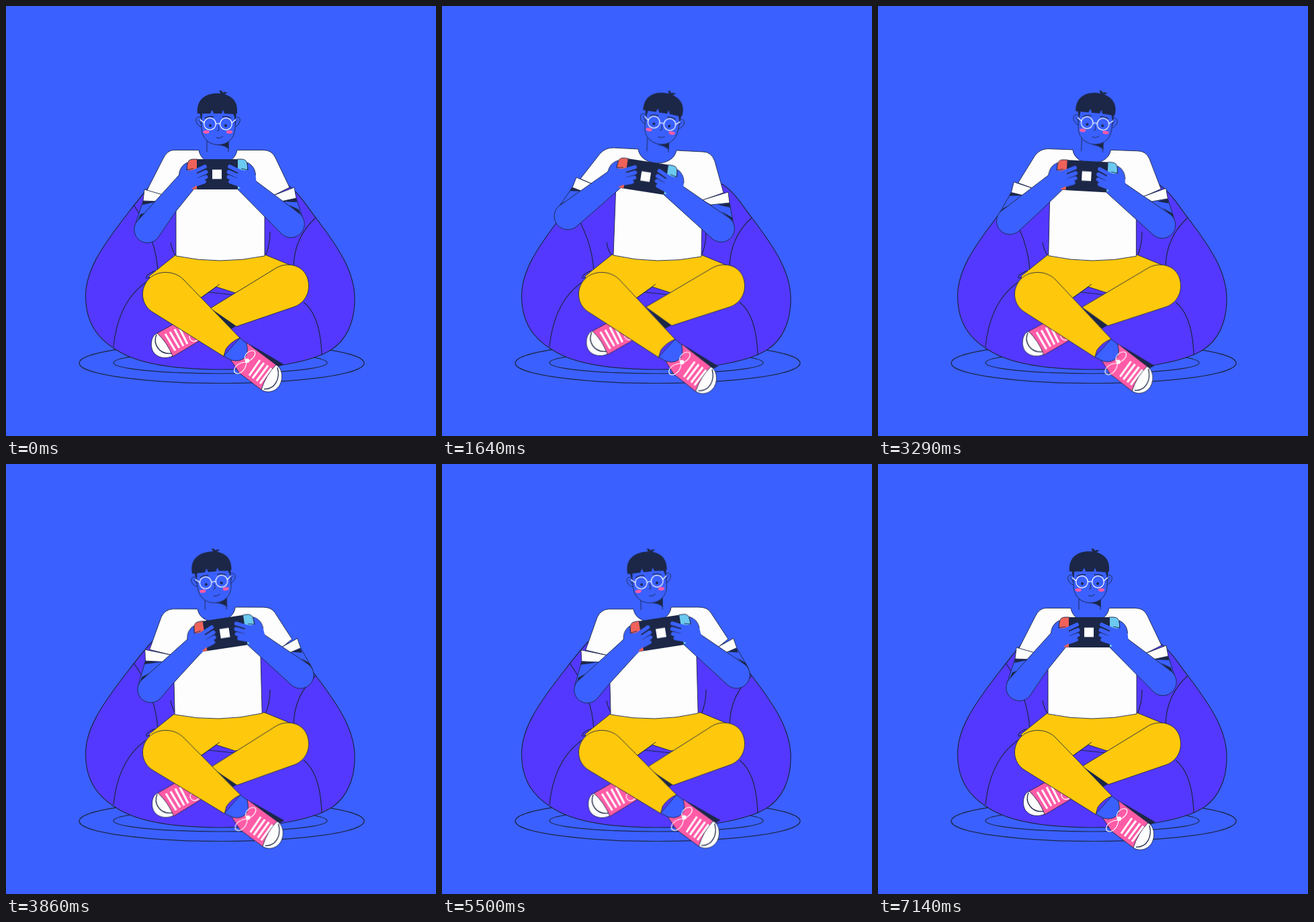
Write an HTML page without scripts that moves like this. It is 640x640 px and loops after 7.21 s.

```html
<!DOCTYPE html>
<html lang="en">
<head>
<meta charset="utf-8">
<title>Handheld gaming on a beanbag</title>
<style>
  :root { --bg: #3a60ff; --ink: #1c2747; --bag: #5438ff; --sun: #fec80c; --pink: #ff5ba7; }
  html, body { margin: 0; width: 100%; height: 100%; overflow: hidden; background: var(--bg); }
  svg { display: block; width: 100vw; height: 100vh; }
  svg { fill: none; stroke: var(--ink); stroke-width: .9; stroke-linejoin: round; }

  .skin { fill: var(--bg); }
  .white { fill: #fdfdfd; }
  .bag { fill: var(--bag); }
  .sun { fill: var(--sun); }
  .pink { fill: var(--pink); }
  .dark { fill: var(--ink); stroke: none; }
  .flat { stroke: none; }
  .lace { stroke: #fff; stroke-width: 1.2; }
  .stripes { stroke: #fff; stroke-width: 3; }
  .fingers { stroke: var(--bg); stroke-width: 5.8; stroke-linecap: round; }

  /* rest, lean left, lean right, back to rest */
  .sway, .bend { animation: sway 7210ms cubic-bezier(.5, 0, .1, 1) infinite; }
  .bend { d: var(--n); animation-name: bend; }
  @keyframes sway {
    0%, 6.93%, 91.63%, 100% { transform: translate(0, 0) rotate(0deg); }
    24.97%, 40.27% { transform: var(--l); }
    58.3%, 73.6% { transform: var(--r); }
  }
  @keyframes bend {
    0%, 6.93%, 91.63%, 100% { d: var(--n); }
    24.97%, 40.27% { d: var(--l); }
    58.3%, 73.6% { d: var(--r); }
  }

  .console {
    transform-origin: 314.5px 250.5px;
    --l: translate(-11px, 3.5px) rotate(8.8deg);
    --r: translate(12.5px, 1px) rotate(-9.2deg);
  }
  .head {
    transform-origin: 316px 205px; animation-delay: 40ms;
    --l: translate(7.3px, -1px) rotate(8.7deg);
    --r: translate(-4px, 0px) rotate(-6.6deg);
  }
  .neck {
    transform-origin: 315px 214px; animation-delay: 20ms;
    --l: translate(6px, 0px) rotate(3deg);
    --r: translate(-3px, 0px) rotate(-1deg);
  }
  .leg {
    animation-delay: 110ms;
    --l: translate(0px, 0px) rotate(1deg);
    --r: translate(0px, 0px) rotate(-.9deg);
  }
  .front { transform-origin: 235px 428px; }
  .back { transform-origin: 419px 417px; }

  .shirt {
    --n: path("M287 214.5 L250 214.5 Q240 214.5 234 227 L209 276 L237 282 L253 292 L253 372 Q319 386 385 372 L385 300 L398 282 L422 270 L401 226 Q396 214.5 383 214.5 L344 214.5 C340 242 291 242 287 214.5 Z");
    --l: path("M292 213 L255 211 Q243 211 235 220 L206 257 L231 268 L259 265 L255 371 Q320 386 386 373 L387 320 L388 289 L419 278 L406 231 Q401 217 388 217 L349 215 C344 241 296 240 292 213 Z");
    --r: path("M285 216 L248 216 Q236 217 231 228 L214 277 L247 285 L249 295 L251 373 Q317 386 381 371 L378.5 280 L412 272 L426 260 L400 221 Q395 213 382 213 L341 213 C338 241 288 242 285 216 Z");
  }
  .arm-a {
    --n: path("M204 290 L191.5 328 L215 330 L226 291");
    --l: path("M194 270 L169 305 L190 310 L212 277");
    --r: path("M208 294 L198 330 L220 330 L236 295");
  }
  .arm-b {
    --n: path("M432 286 L443 320 L420 320 L409 290");
    --l: path("M428 293 L434 326 L412 326 L400 295");
    --r: path("M439 273 L457.5 305 L436 310 L424 280");
  }
  .shade-a {
    --n: path("M204 290 L226 291 L203 296 Z M200 310 L212 306 L195 321 Z");
    --l: path("M193 270 L210 276 L190 275 Z M179 293 L190 288 L173 299 Z");
    --r: path("M208 294 L230 296 L206 299 Z M203 318 L221 309 L201 325 Z");
  }
  .shade-b {
    --n: path("M432 286 L409 291 L433 292 Z M421 296 L436 303 L439 311 Z");
    --l: path("M428 293 L411 296 L429 300 Z M415 305 L432 315 L433 320 Z");
    --r: path("M439 274 L424 279 L441 280 Z M440 288 L453 296 L457 304 Z");
  }
  .cuff-a {
    --n: path("M206 273 L204 290 L228 291 L237 282 Z");
    --l: path("M200 255 L194 270 L212 277 L231 268 Z");
    --r: path("M207 277 L208 294 L235 295 L247 285 Z");
  }
  .cuff-b {
    --n: path("M429 270 L432 286 L409 291 L398 282 Z");
    --l: path("M426 277 L428 293 L400 296 L387 289 Z");
    --r: path("M434 259 L439 273 L424 280 L411 272 Z");
  }
  .fore-a {
    --n: path("M258 251 L195 320.5 A19 19 0 0 0 226 345 L253 305.5 L284 267");
    --l: path("M247.5 246 L174 297.5 A19 19 0 0 0 200 328 L236 297 L271 266");
    --r: path("M271.3 261 L202 323.5 A19 19 0 0 0 231 349.5 L249 328 L299.5 272.7");
  }
  .fore-b {
    --n: path("M370 259 L437.5 309.5 A19 19 0 0 1 410.5 339.5 L345 273");
    --l: path("M359.5 269 L428.5 316.5 A19 19 0 0 1 402.5 346.5 L330 281");
    --r: path("M382 251 L451.5 298 A19 19 0 0 1 426.5 329 L360.7 268.8");
  }
</style>
</head>
<body>
<svg viewBox="0 0 640 640">
  <defs>
    <g id="hand">
      <path class="skin flat" d="M257.5 252 C258 242 263 236 270 233 L269 244 Q277 246 283 242 L286 266 L274 276 L256 266 Z"/>
      <path d="M257.5 252 C258 242 263 236 270 233 L269 244 L279 242"/>
      <path class="fingers" d="M275 249 L296 239 M277 256 L297.5 247 M278 262 L297.5 254.5 M279 267 L295 261.5"/>
    </g>
    <g id="ear">
      <path class="skin" d="M292 167 C287 163 281 166 283 172 Q285 179 292 180"/>
      <path d="M286 169 Q289 171 290 176"/>
    </g>
  </defs>

  <!-- floor rings and beanbag -->
  <g stroke-width="1.2">
    <ellipse cx="321" cy="531.5" rx="212" ry="30"/>
    <ellipse cx="319" cy="531" rx="159" ry="16"/>
    <path class="bag" d="M218 264 C206 276 191 296 177 314 C140 362 118 396 118.5 433 C119 475 140 497 163 511 C195 533 250 541 320 541 C400 541 455 528 480 514 C506 500 520 470 519 433 C518 396 497 362 461 315 C450 301 436 277 417 265 Z"/>
    <path d="M190 296 Q224 345 226 397 M461 315 Q429 344 428 388 M245 352 Q247 364 253 372 M393 336 Q393 356 386 372"/>
    <path d="M222 403 Q168 430 160 507 M443 441 Q468 460 470 520 M302 426 L340 430 M222 394 Q207 400 209 405 L216 404"/>
  </g>

  <!-- legs -->
  <path class="sun" d="M253 370 H385 L424 386 L400 420 L341 427 L313 418 L289 435 L220 440 L213 402 Z"/>
  <path d="M289 435 L318 414"/>
  <g class="sway leg back">
    <path class="pink" d="M225 487 L252 472 L292 496 L248 522 Z"/>
    <path class="stripes" d="M237 488 L252 513 M244 485 L258 509 M251 481 L264 506 M258 479 L270 503"/>
    <path class="lace" d="M290 488 C278 484 270 490 274 496 C278 502 284 499 290 492"/>
    <path class="white" d="M225 487 C215 491 214 508 220 516 C227 525 240 525 248 521 Q240 501 225 487 Z"/>
    <path stroke-width="1.3" d="M224 489 C218 503 228 519 246 517"/>
    <path class="dark" d="M302 448 L343 476 L333 482 Z"/>
    <path class="sun" d="M304 450 L402 390 C417 381 440 384 448 403 C456 425 444 443 428 448 L343 477 Z"/>
  </g>
  <g class="sway leg front">
    <path class="dark" d="M362 503 L413 533 L404 538 Z"/>
    <path class="pink" d="M358 501 L402 534 L381 572 L347 546 L334 526 Z"/>
    <path class="white" d="M402 534 C411 539 413 553 408 563 C403 573 390 578 380 571 Q387 549 402 534 Z"/>
    <path stroke-width="1.3" d="M404 538 C409 556 399 571 384 570"/>
    <path class="stripes" d="M362 550 L378 527 M367 554 L384 531 M373 558 L390 535 M378 562 L395 539"/>
    <path class="skin" d="M324 521 L348 494 L358 502 Q361 514 357 521 Q350 531 335 527 Z"/>
    <path class="lace" d="M358 530 C350 519 364 510 370 514 C373 520 366 527 358 530 C348 530 338 536 340 545 C346 551 357 543 358 530"/>
    <circle class="white flat" cx="359" cy="528" r="3.2"/>
    <path class="sun" d="M348 494 L264 407 C251 394 229 393 215 404 C198 419 200 445 219 456 L324 521.5 L327 511 Q334 500 348 494 Z"/>
  </g>

  <!-- torso and upper arms -->
  <path class="skin bend arm-a"/>
  <path class="skin bend arm-b"/>
  <path class="dark bend shade-a"/>
  <path class="dark bend shade-b"/>
  <path class="white bend shirt"/>
  <path class="white bend cuff-a"/>
  <path class="white bend cuff-b"/>

  <g class="sway neck">
    <path class="skin" d="M299 217 V194 H331 V217"/>
    <path class="dark" d="M314 207 Q326 206 331.5 198 V213 Q325 207 314 207 Z"/>
  </g>

  <g class="sway head">
    <use href="#ear"/>
    <use href="#ear" transform="matrix(-1 0 0 1 631 0)"/>
    <path class="skin" d="M291 155 V180 C291 197 302 206.5 316 206.5 C330 206.5 341 197 341 180 V155 Z"/>
    <path class="dark" d="M285 160 C283 139 297 130 314 130 C333 130 346 140 344 159 L342.5 161 L341.5 170 L338.5 161 L325 160 L323 154 L321 160 L309 160 L307 154 L304 160 L292.5 160 L290.5 170 L288.5 160 Z"/>
    <path class="dark" d="M320 132 L317.5 126 Q321 125 323 129 Q325 127 330 129 Q325 130 325 133 Z"/>
    <path stroke-width="1.4" d="M296 167 Q302 163 309 165 M322 165 Q329 163 335 167"/>
    <g class="flat">
      <ellipse class="pink" cx="298" cy="187.5" rx="4.6" ry="2.4"/>
      <ellipse class="pink" cx="332.5" cy="187.5" rx="4.6" ry="2.4"/>
    </g>
    <circle class="dark" cx="304" cy="178" r="2"/>
    <circle class="dark" cx="327" cy="178" r="2"/>
    <path d="M316 178 L317 185 L314 186 M313 196 Q319 198 323 194"/>
    <g class="lace">
      <circle cx="303.5" cy="175.5" r="8.8"/>
      <circle cx="327.5" cy="175.5" r="8.8"/>
      <path d="M312 176 Q315.5 173.5 319 176 M295 174 L289 169 M336 174 L342 169"/>
    </g>
  </g>

  <!-- handheld -->
  <g class="sway console">
    <path fill="#f0625a" d="M285 228 H278 Q270 228 269.5 238 V262 Q270 272 278 272.5 H285 Z"/>
    <path fill="#6cc9f0" d="M344 228 H351 Q359 228 359.5 238 V262 Q359 272 351 272.5 H344 Z"/>
    <rect class="dark" x="284" y="228" width="61" height="45" rx="2"/>
    <rect class="white flat" x="307" y="243.5" width="14" height="14"/>
  </g>

  <path class="skin bend fore-a"/>
  <path class="skin bend fore-b"/>
  <g class="sway console">
    <use href="#hand"/>
    <use href="#hand" transform="matrix(-1 0 0 1 629 0)"/>
    <path class="flat" fill="#f0625a" d="M276 272 L284 267 V272.5 H278 Z"/>
  </g>
</svg>
</body>
</html>
```
